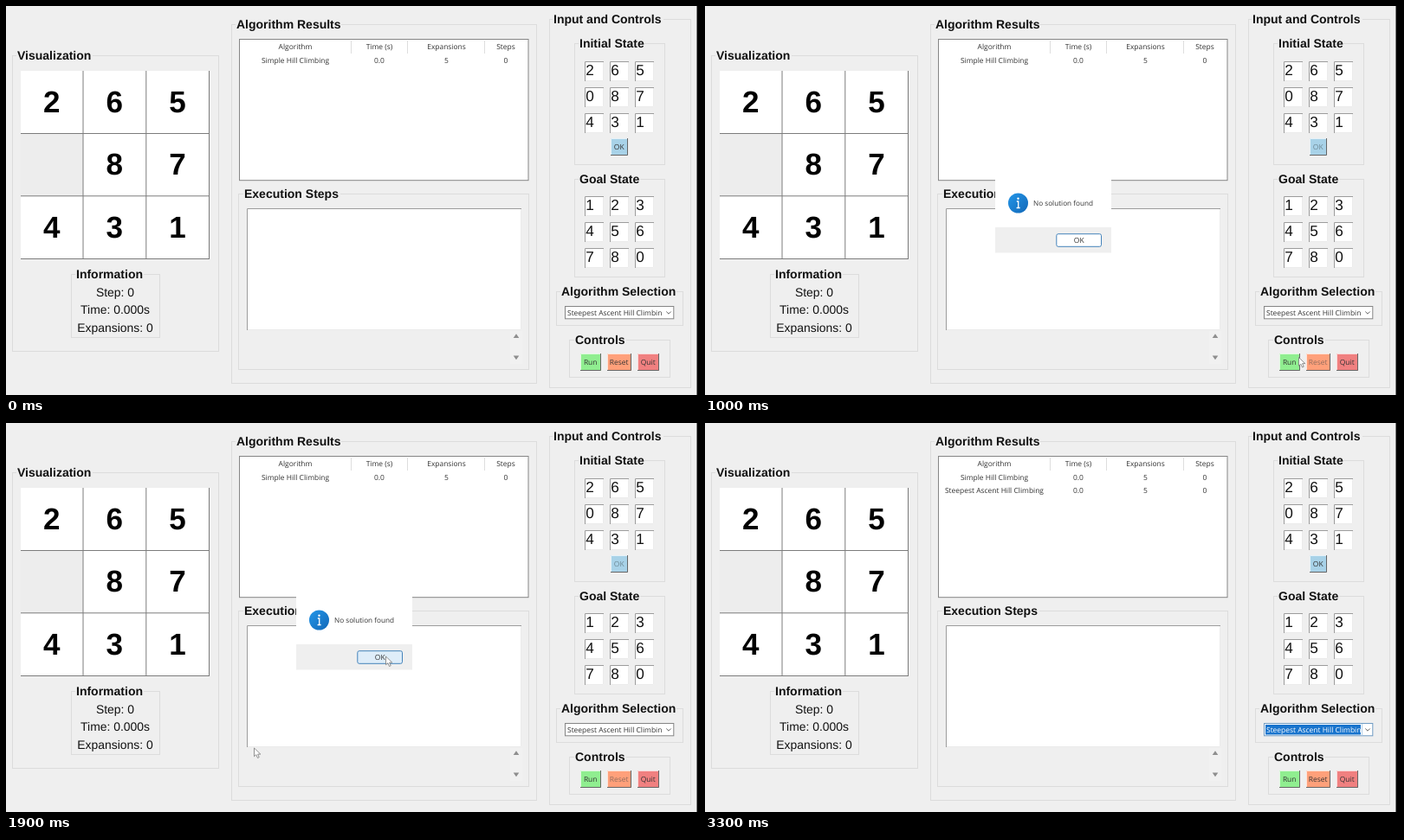
These frames come from a looping animation (800x450 px, 3400 ms). An HTML page:

```html
<!DOCTYPE html>
<html lang="en">
<head>
<meta charset="utf-8">
<title>Puzzle solver</title>
<style>
  html, body { margin: 0; width: 100%; height: 100%; overflow: hidden; background: #efefef; }
  svg { display: block; width: 800px; height: 450px; text-rendering: geometricPrecision; }
  text { font-family: "Liberation Sans", Arial, sans-serif; fill: #111; white-space: pre; }
  .title { font-size: 14px; font-weight: bold; }
  .info { font-size: 13.9px; }
  .tile { font-size: 35px; font-weight: bold; fill: #000; }
  .entry { font-size: 17.2px; }
  .ui { font-family: "Open Sans", "Noto Sans", sans-serif; font-size: 8.45px; fill: #333; }
  .mid { text-anchor: middle; }
</style>
</head>
<body>
<svg id="stage" viewBox="0 0 800 450"></svg>
<script>
const LOOP = 3400, STEP = 100;
const FOCUS = 400, RUN = 800, POPUP = 900, HOVER = 1900, CLOSE = 2600, CLEAN = 2900;
const stage = document.getElementById("stage");

function add(tag, attrs, parent = stage) {
  const node = document.createElementNS("http://www.w3.org/2000/svg", tag);
  for (const key in attrs) node.setAttribute(key, attrs[key]);
  parent.appendChild(node);
  return node;
}

function rect(x, y, right, bottom, fill, parent, extra) {
  return add("rect", { x, y, width: right - x, height: bottom - y, fill, ...extra }, parent);
}

function path(d, stroke, parent, extra) {
  return add("path", { d, stroke, fill: "none", ...extra }, parent);
}

function label(str, x, y, cls, parent) {
  const node = add("text", { x, y, class: cls }, parent);
  node.textContent = str;
  return node;
}

function group(title, x, y, right, bottom, textX, textEnd) {
  rect(x + .5, y + .5, right - .5, bottom - .5, "none", stage, { stroke: "#dcdcdc" });
  rect(textX - 1, y - 2, textEnd + 1, y + 3, "#efefef");
  label(title, textX, y + 5, "title");
}

function sunken(x, y, right, bottom) {
  rect(x, y, right, bottom, "#fff");
  path(`M${x + .5} ${bottom}V${y + .5}H${right}`, "#9c9c9c");
  path(`M${right - .5} ${y + 1}V${bottom - .5}H${x + 1}`, "#ebebeb");
}

function entries(digits, top) {
  [...digits].forEach((digit, i) => {
    const x = 668 + 29 * (i % 3), y = top + 30 * Math.floor(i / 3);
    sunken(x, y, x + 22, y + 23);
    label(digit, x + 1.3, y + 16.4, "entry");
  });
}

function button(str, x, y, right, bottom, fill) {
  rect(x, y, right, bottom, fill);
  path(`M${x + .5} ${bottom}V${y + .5}H${right}`, "#fff", stage, { "stroke-opacity": .7 });
  path(`M${right - .5} ${y}V${bottom - .5}H${x}`, "#666");
  return label(str, (x + right) / 2 - .3, (y + bottom) / 2 + 3, "ui mid");
}

function row(cells, y) {
  const g = add("g", {});
  cells.forEach((cell, i) => label(cell, [334, 431, 508.5, 577][i], y, "ui mid", g));
  return g;
}

function cursor() {
  return path("M.5 .5V10.2L2.8 8.2L4.5 12L6.2 11.2L4.6 7.6H7.8Z", "#777", stage,
    { fill: "#fff", "stroke-width": .8, "stroke-linejoin": "round" });
}

// Board
group("Visualization", 7, 57, 246, 400, 13, 99);
rect(17, 75, 235, 293, "#fff");
rect(17, 148, 89, 220, "#ededed");
path("M89 75V293M161.8 75V293M234.5 75V293M17 147.5H235M17 219.8H235M17 292.5H235", "#7c7c7c");
[..."265 87431"].forEach((digit, i) =>
  label(digit, 52.7 + 72.6 * (i % 3), 122.5 + 72.9 * Math.floor(i / 3), "tile mid"));

group("Information", 75, 310, 178, 384, 81, 158);
["Step: 0", "Time: 0.000s", "Expansions: 0"].forEach((str, i) =>
  label(str, 126, 336 + 20.3 * i, "info mid"));

// Results and steps
group("Algorithm Results", 260, 21, 613, 437, 266, 386);
rect(269.5, 38.5, 603, 201.7, "#fff", stage, { stroke: "#858585" });
path("M398.5 40V55M463.5 40V55M552.5 40V55", "#dedede");
row(["Algorithm", "Time (s)", "Expansions", "Steps"], 50);
row(["Simple Hill Climbing", "0.0", "5", "0"], 66);
const newRow = row(["Steepest Ascent Hill Climbing", "0.0", "5", "0"], 80.7);

group("Execution Steps", 268, 217, 604, 421, 275, 385);
sunken(278, 234, 595, 375);
rect(582, 376, 596, 414, "#f1f1f1");
path("M585.7 384H592.3L589 379.2ZM585.7 404.5H592.3L589 409.3Z", "none", stage, { fill: "#8e8e8e" });

// Inputs
group("Input and Controls", 627, 15, 791, 442, 632, 758);
group("Initial State", 656, 43, 761, 184, 662, 735);
entries("265087431", 64);
const okText = button("OK", 698, 153, 718, 173, "#a8d2e8");
group("Goal State", 656, 200, 761, 314, 662, 731);
entries("123456780", 220);

group("Algorithm Selection", 635, 330, 782, 370, 641, 773);
const combo = rect(645.5, 347.5, 770.8, 361.8, "#fff", stage, { stroke: "#858585" });
const focusMark = add("g", {});
rect(647, 349, 757, 360.5, "#1874cd", focusMark);
path("M758.5 348V361.5", "#b4cfe6", focusMark);
const choice = label("Steepest Ascent Hill Climbin", 648, 358, "ui");
path("M762.3 353.5L765 356.2L767.7 353.5", "#666");

group("Controls", 650, 386, 767, 430, 657, 715);
button("Run", 663, 402, 687, 422, "#90ee90");
const resetText = button("Reset", 694, 402, 722, 422, "#ffa07a");
button("Quit", 729, 402, 754, 422, "#f08080");
rect(797.5, 0, 800, 450, "#000");

// Message box
const dialog = add("g", {});
rect(335, 201, 469, 256, "#fff", dialog);
rect(335, 256, 469, 285.5, "#efefef", dialog);
const blue = add("linearGradient", { id: "blue", x2: 1, y2: 1 });
add("stop", { offset: 0, "stop-color": "#2496e8" }, blue);
add("stop", { offset: 1, "stop-color": "#1268b8" }, blue);
add("circle", { cx: 361.5, cy: 228, r: 11.5, fill: "url(#blue)" }, dialog);
add("circle", { cx: 361.5, cy: 222.8, r: 1.2, fill: "#fff" }, dialog);
path("M359.8 226H361.7V233.5M359.6 233.5H363.6", "#fff", dialog, { "stroke-width": 1.3 });
label("No solution found", 379, 231.3, "ui", dialog).style.fontSize = "8.2px";
const confirm = rect(405.8, 263.7, 457.5, 278.3, "#fff", dialog, { rx: 2, stroke: "#4483bb" });
label("OK", 431.7, 274, "ui mid", dialog);

const trail = cursor(), pointer = cursor();

const stops = [[1000, 685, 406], [1500, 330, 387.5], [1800, 286, 375.5], [HOVER, 438, 269.5]];

function pointerAt(t) {
  let i = 0;
  while (i < stops.length - 2 && t >= stops[i + 1][0]) i++;
  const [t0, x0, y0] = stops[i], [t1, x1, y1] = stops[i + 1];
  const p = Math.max(0, Math.min(1, (t - t0) / (t1 - t0)));
  const ease = p * p * (3 - 2 * p);
  return [x0 + (x1 - x0) * ease, y0 + (y1 - y0) * ease];
}

function show(node, on) {
  node.setAttribute("visibility", on ? "visible" : "hidden");
}

function place(node, [x, y]) {
  node.setAttribute("transform", `translate(${x} ${y})`);
}

function render(time) {
  const t = Math.floor((time % LOOP) / STEP) * STEP;
  const within = (from, to) => t >= from && t < to;
  const busy = within(RUN, CLOSE);
  const open = within(POPUP, CLOSE);
  const focused = t >= FOCUS && !open;

  show(focusMark, focused);
  combo.setAttribute("stroke", focused ? "#6f9cc4" : "#858585");
  choice.style.fill = focused ? "#fff" : "#333";
  okText.style.fill = busy ? "#6f8a96" : "#333";
  resetText.style.fill = busy ? "#8f6c5e" : "#333";
  show(dialog, open);
  confirm.setAttribute("fill", t >= HOVER ? "#deedf9" : "#fff");
  show(newRow, t >= CLOSE);
  show(pointer, open);
  place(pointer, pointerAt(t));
  show(trail, within(HOVER, CLEAN));
  place(trail, [286, 375.5]);
}

const start = performance.now();
function tick() {
  render(performance.now() - start);
  requestAnimationFrame(tick);
}
tick();
</script>
</body>
</html>
```
